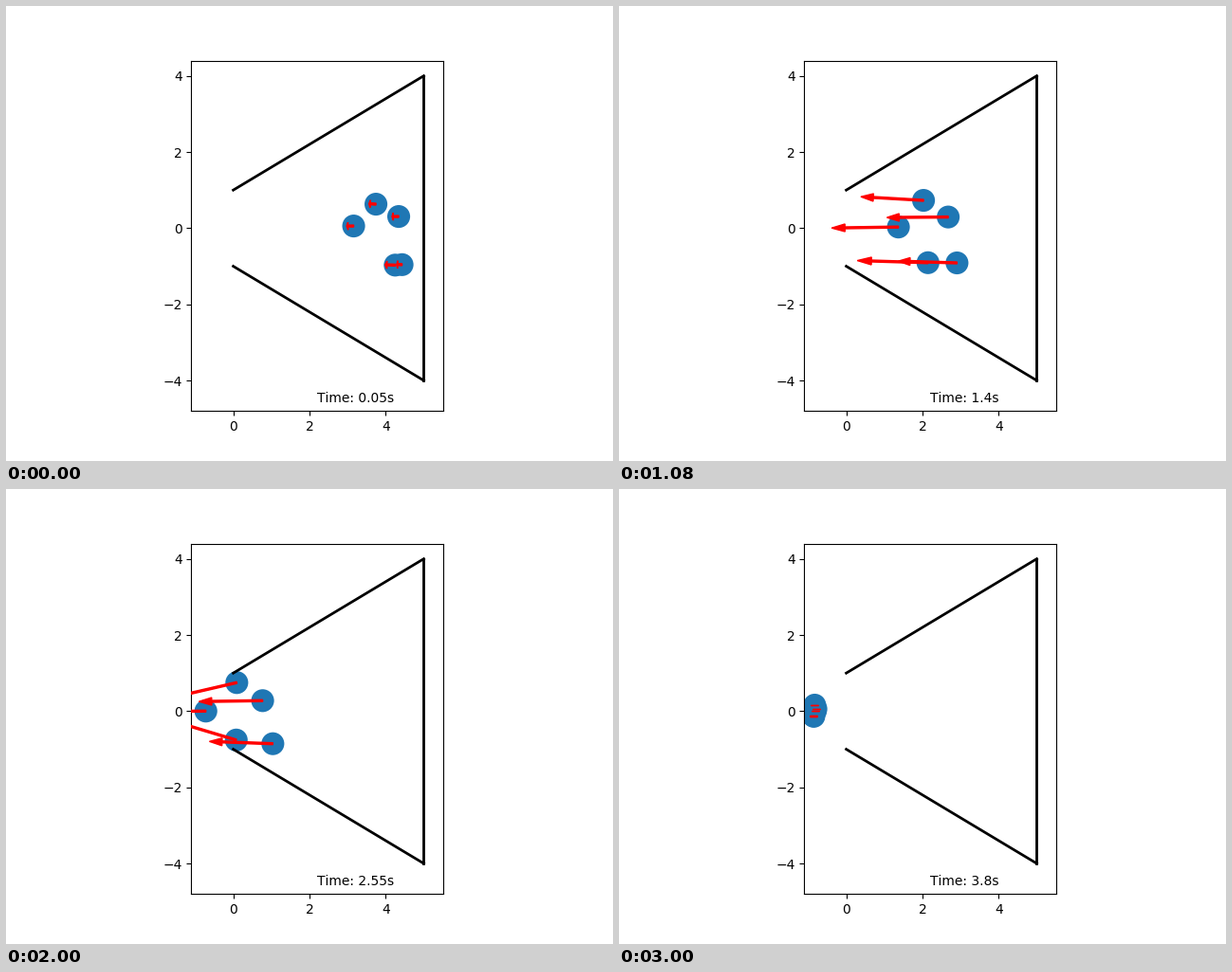
A matplotlib script for the animation above (3.04 s loop, 640 by 480 pixels).

```python
import numpy as np
import matplotlib.pyplot as plt
from matplotlib.animation import FuncAnimation
from matplotlib.patches import Circle

FRAMES, INTERVAL = 76, 40
DT, TAU = 0.05, 0.5          # time step, time to reach full speed
PUSH_DECAY = 1.1             # fading time of the push from the crowd
GOAL, GOAL_RADIUS = np.array([-1, 0]), 0.26
DOOR, TURN = 0.08, 0.25      # where walkers turn to the goal, and how softly
RADIUS = 0.3
AT_REST = (0, 1e-6)

WALLS = [((0, 5), (1, 4)), ((5, 5), (4, -4)), ((0, 5), (-1, -4))]

# x, y, cruising speed, first push, sideways drift
WALKERS = np.array([
    (3.16, 0.057, 1.85, 0, -0.015),
    (3.745, 0.63, 1.69, 0.17, 0.058),
    (4.342, 0.306, 1.67, 0.10, -0.008),
    (4.25, -0.97, 1.66, 1.02, 0.03),
    (4.43, -0.958, 1.70, -0.25, 0.03),
])


def velocity(pos, step, cruise, push, drift):
    """Speed up from rest, walk left, then turn to the goal at the door."""
    ramp = 1 - (1 - DT / TAU) ** (step + 1)
    speed = ramp * (cruise + push * np.exp(-step * DT / PUSH_DECAY))
    to_goal = GOAL - pos
    aim = -to_goal[:, 1] / to_goal[:, 0]
    turn = 1 / (1 + np.exp((pos[:, 0] - DOOR) / TURN))
    slope = drift + (aim - drift) * turn
    heading = np.column_stack([-np.ones_like(slope), slope])
    heading /= np.linalg.norm(heading, axis=1, keepdims=True)
    return heading * speed[:, None]


def simulate():
    pos, traits = WALKERS[:, :2], WALKERS[:, 2:].T
    states = [(pos, velocity(pos, 0, *traits))]
    for step in range(1, FRAMES):
        vel = velocity(pos, step, *traits)
        vel[np.linalg.norm(pos - GOAL, axis=1) < GOAL_RADIUS] = AT_REST
        pos = pos + DT * vel
        arrived = np.linalg.norm(pos - GOAL, axis=1) < GOAL_RADIUS
        vel[arrived] = AT_REST
        states.append((pos, vel))
    return states


states = simulate()

plt.rcParams['text.kerning_factor'] = 6
fig, ax = plt.subplots(figsize=(6.4, 4.8), dpi=100)
ax.set_aspect('equal')
ax.set_xlim(-1.1, 5.5)
ax.set_ylim(-4.8, 4.4)
ax.set_xticks(range(0, 5, 2))
ax.set_yticks(range(-4, 5, 2))

for xs, ys in WALLS:
    ax.plot(xs, ys, color='black', lw=2)

discs = [ax.add_patch(Circle(p, RADIUS, fc='tab:blue')) for p in states[0][0]]
clock = ax.text(0.5, 0.025, '', transform=ax.transAxes)
arrows = []


def draw_arrow(pos, vel):
    return ax.arrow(*pos, *vel, width=0.05, head_width=0.2,
                    head_length=0.2 * np.hypot(*vel),
                    length_includes_head=True, color='red', zorder=3)


def update(i):
    while arrows:
        arrows.pop().remove()
    for disc, pos, vel in zip(discs, *states[i]):
        disc.center = pos
        arrows.append(draw_arrow(pos, vel))
    clock.set_text(f'Time: {round(DT * (i + 1), 2)}s')
    return [*discs, *arrows, clock]


anim = FuncAnimation(fig, update, frames=FRAMES, interval=INTERVAL,
                     init_func=lambda: update(0), repeat=True, repeat_delay=0)
plt.show()
```
